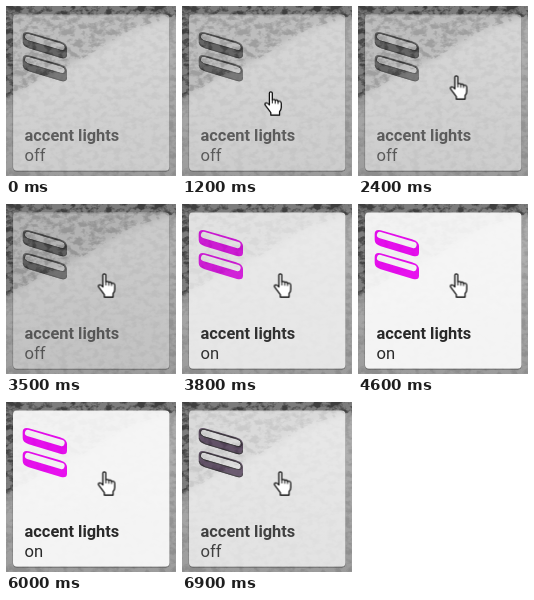
These frames come from a looping animation (170x170 px, 7000 ms). An HTML page:

```html
<!DOCTYPE html>
<html lang="en">
<head>
<meta charset="utf-8">
<title>Accent lights card</title>
<style>
html, body { margin: 0; width: 100%; height: 100%; overflow: hidden; background: #999; }
svg { display: block; width: 100vw; height: 100vh; }
text { font: 400 16.6px Roboto, Arial, sans-serif; fill: #222; }
.title { font-weight: 700; font-size: 16.4px; }

.card, .icon, .on, .off, .press, .hand { animation: 7s step-end infinite; }
.card { animation-name: fade; }
.icon { animation-name: tint; }
.on { animation-name: on; }
.off { animation-name: off; }
.press { animation-name: press; }
.hand { animation-name: move; }

/* one percent is 70 ms */
@keyframes fade {
  0% { opacity: .52; }
  51.42% { opacity: .62; }
  52.85% { opacity: .76; }
  54.28% { opacity: .86; }
  55.71% { opacity: .9; }
  57.14% { opacity: .92; }
  59.99% { opacity: .94; }
  95.71% { opacity: .9; }
  97.14% { opacity: .83; }
  98.57%, 100% { opacity: .75; }
}
@keyframes tint {
  0% { fill: #505050; }
  51.42% { fill: #9a2aa0; }
  52.85% { fill: #cc16d4; }
  54.28% { fill: #e010e8; }
  57.14% { fill: #ec08f4; }
  95.71% { fill: #b030b8; }
  97.14% { fill: #7d4585; }
  98.57%, 100% { fill: #5a4560; }
}
@keyframes on {
  0% { opacity: 0; }
  51.42% { opacity: 1; }
  95.71%, 100% { opacity: 0; }
}
@keyframes off {
  0% { opacity: 1; }
  51.42% { opacity: 0; }
  95.71%, 100% { opacity: 1; }
}
@keyframes press {
  0% { opacity: 0; }
  49.99%, 79.99% { opacity: .05; }
  51.42%, 81.42% { opacity: .17; }
  52.85%, 82.85% { opacity: .1; }
  54.28%, 84.28% { opacity: .02; }
  55.71%, 85.71%, 100% { opacity: 0; }
}
@keyframes move {
  0% { opacity: 0; transform: translate(82px, 85px); }
  17.14% { opacity: 1; transform: translate(82px, 85px); }
  18.57% { opacity: 1; transform: translate(66px, 95px); }
  19.99% { opacity: 1; transform: translate(53px, 99px); }
  22.85% { opacity: 1; transform: translate(47px, 86px); }
  24.28% { opacity: 1; transform: translate(63px, 71px); }
  25.71% { opacity: 1; transform: translate(85px, 61px); }
  27.14% { opacity: 1; transform: translate(101px, 58px); }
  32.85% { opacity: 1; transform: translate(97px, 64px); }
  34.28%, 100% { opacity: 1; transform: translate(91.5px, 69px); }
}
</style>
</head>
<body>
<svg viewBox="0 0 170 170">
  <defs>
    <linearGradient id="ground" x1="0" y1="0" x2="0" y2="1">
      <stop offset=".3" stop-color="#aeaeae"/>
      <stop offset="1" stop-color="#9c9c9c"/>
    </linearGradient>
    <filter id="soft" x="-20%" y="-20%" width="140%" height="140%">
      <feGaussianBlur stdDeviation="3"/>
    </filter>
    <filter id="grain" x="0" y="0" width="100%" height="100%" color-interpolation-filters="sRGB">
      <feTurbulence type="fractalNoise" baseFrequency=".13 .17" numOctaves="3" seed="8"/>
      <feColorMatrix values="0 0 0 0 .12  0 0 0 0 .12  0 0 0 0 .12  4 0 0 0 -1.7"/>
    </filter>
    <path id="bank" d="M-15-15H185V6L128 22 74 54 35 72-15 104Z"/>
    <clipPath id="rocks"><use href="#bank"/></clipPath>
    <path id="body" d="M16.7 30Q16.7 25 22.7 26.2L54 35.2Q61 37.5 61 42V48.5Q61 53.5 55 52L22.7 42.2Q16.7 40.2 16.7 36Z"/>
    <path id="top" d="M22 31L55.5 41" stroke="#fafafa" stroke-width="6.2" stroke-linecap="round"/>
    <path id="rim" fill="none" stroke="#2c2c2c" d="M23 27.4L54.5 36.6Q59.5 38.4 59.8 42T54.5 44.2L22 34.8Q18 33 18 30T23 27.4M17.2 36Q17.2 39.8 23 41.7L55 51.4Q60.4 53 60.5 48.5"/>
  </defs>

  <rect width="170" height="170" fill="url(#ground)"/>
  <use href="#bank" fill="#7c7c7c" filter="url(#soft)"/>
  <rect width="170" height="170" filter="url(#grain)" opacity=".12"/>
  <g clip-path="url(#rocks)">
    <rect width="170" height="170" filter="url(#grain)" opacity=".6"/>
  </g>

  <rect x="7" y="9.5" width="156.5" height="156" rx="4" fill="none" stroke="#000" opacity=".22"/>
  <g class="card">
    <rect x="7" y="8.5" width="156.5" height="156" rx="4" fill="#fafafa"/>
    <g class="icon">
      <use href="#body"/>
      <use href="#body" y="23"/>
    </g>
    <use href="#top"/>
    <use href="#top" y="23"/>
    <g class="off">
      <use href="#rim"/>
      <use href="#rim" y="23"/>
      <text x="18.5" y="155">off</text>
    </g>
    <text class="title" x="18.5" y="135">accent lights</text>
    <text class="on" x="18.5" y="155">on</text>
  </g>
  <rect class="press" x="7" y="8.5" width="156.5" height="156" rx="4"/>

  <g class="hand" stroke="#111" stroke-width="1.2" stroke-linejoin="round">
    <g transform="scale(1.08 1.03)">
      <path fill="#fff" d="M5 2Q5 .8 6.3.8T7.7 2V8.5Q10 7.6 10.4 9 12.6 8.3 13 10 15.8 9.4 16 11.8V16Q16 18 14.4 20V23.4H6.3V21Q3.5 17 1 13.6 .4 11.8 2 11.4 3.4 11.3 5 13.6Z"/>
      <path fill="none" stroke-width=".9" d="M7.7 8.5V12M10.4 9V12.3M13 10V12.6"/>
    </g>
  </g>
</svg>
</body>
</html>
```
